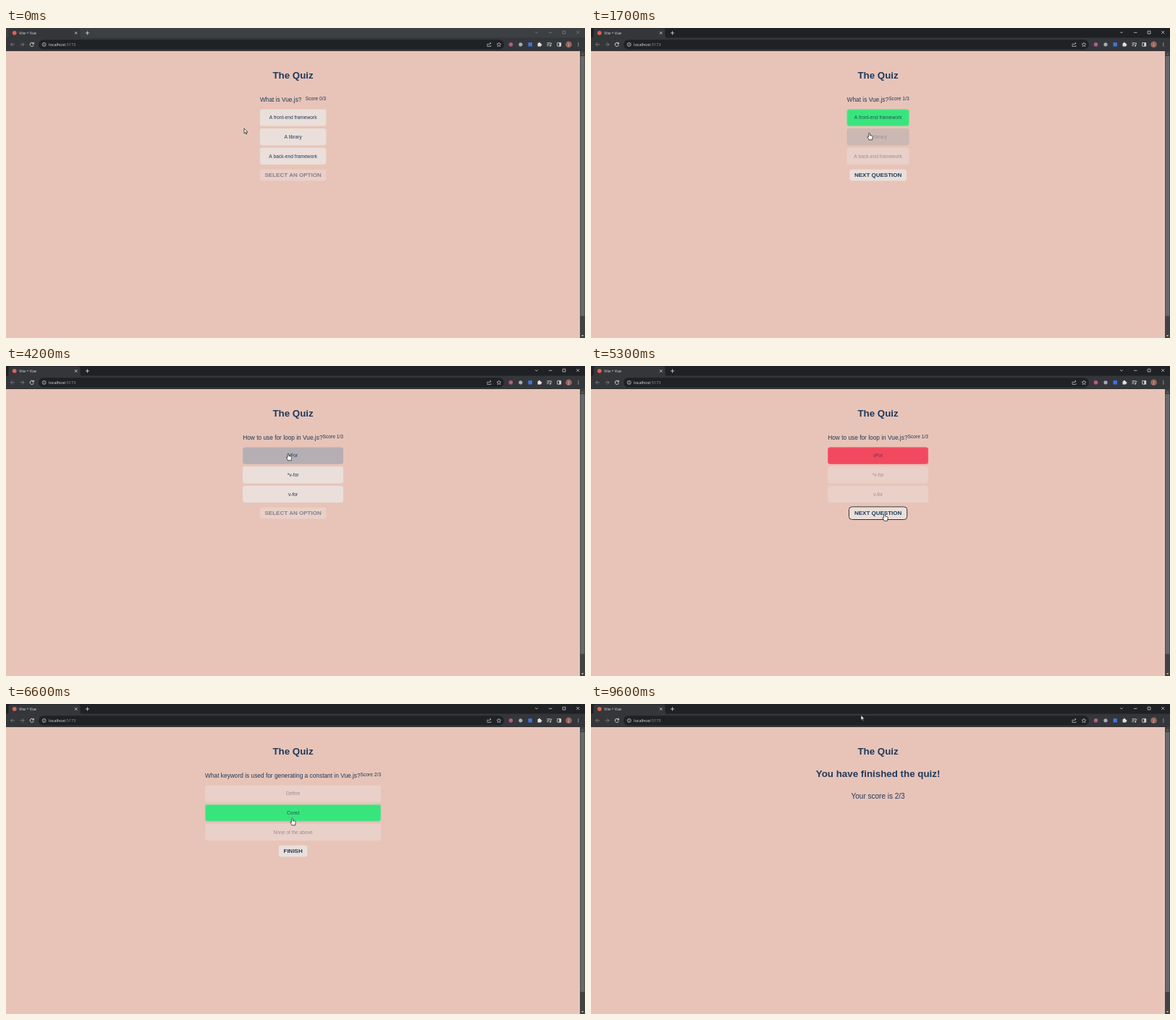
These frames come from a looping animation (800 px wide and 429 px high, 9800 ms). An HTML page with a canvas:

```html
<!DOCTYPE html>
<html lang="en">
<head>
<meta charset="utf-8">
<title>The Quiz</title>
<style>
  html, body { margin: 0; width: 100%; height: 100%; overflow: hidden; background: #e8c4b8; }
  canvas { display: block; width: 800px; height: 429px; }
</style>
</head>
<body>
<canvas id="stage" width="800" height="429"></canvas>
<script>
const ctx = document.getElementById('stage').getContext('2d');
const LOOP = 9800, CENTER = 396.6;
const NAVY = '#1f3a5c', PAPER = '#eadfda', FADED = '#e9d0c8';
const SANS = '"Liberation Sans", Arial, sans-serif';
const UI = '"Open Sans", "Noto Sans", sans-serif';

const questions = [
  { text: 'What is Vue.js?', options: ['A front-end framework', 'A library', 'A back-end framework'], pick: 0, right: true },
  { text: 'How to use for loop in Vue.js?', options: ['vFor', '*v-for', 'v-for'], pick: 0, right: false },
  { text: 'What keyword is used for generating a constant in Vue.js?', options: ['Define', 'Const', 'None of the above'], pick: 1, right: true }
];
const answerTimes = [1300, 4500, 6600];
const nextTimes = [2800, 5400, 8300];
const FOCUS_WINDOW = 1200;

// Pointer keyframes: time, x, y
const pointerPath = [
  [0, 329, 139], [800, 375, 122], [1500, 376, 123], [1700, 384.5, 145],
  [2100, 396, 221], [2400, 398, 205], [2700, 398, 205], [3200, 347.5, 170],
  [3600, 347.5, 170], [4200, 390, 121], [4600, 390, 121], [5050, 404, 211],
  [5300, 405.5, 204.5], [5600, 405.5, 204.5], [6000, 395.5, 158], [6600, 395.5, 158],
  [7000, 384, 240], [7100, 384, 240], [7500, 349, 237], [8100, 397.5, 207.5],
  [8300, 397.5, 207.5], [8600, 404, 256], [9100, 420, 47], [9600, 373, 15.5], [LOOP, 373, 15.5]
];

function pointerAt(time) {
  const i = pointerPath.findIndex(key => key[0] > time);
  const [t0, x0, y0] = pointerPath[i - 1], [t1, x1, y1] = pointerPath[i];
  const u = (time - t0) / (t1 - t0), ease = u * u * (3 - 2 * u);
  return { x: x0 + (x1 - x0) * ease, y: y0 + (y1 - y0) * ease };
}

function label(text, x, y, size, color = NAVY, { weight = 400, align = 'center', family = SANS } = {}) {
  ctx.font = `${weight} ${size}px ${family}`;
  ctx.textAlign = align;
  ctx.fillStyle = color;
  ctx.fillText(text, x, y);
}

function widthOf(text, size, weight = 400) {
  ctx.font = `${weight} ${size}px ${SANS}`;
  return ctx.measureText(text).width;
}

function rect(x, y, w, h, color) {
  ctx.fillStyle = color;
  ctx.fillRect(x, y, w, h);
}

function box(x, y, w, h, radius, fill, stroke, lineWidth = 1) {
  ctx.beginPath();
  ctx.roundRect(x, y, w, h, radius);
  if (fill) { ctx.fillStyle = fill; ctx.fill(); }
  if (stroke) { ctx.strokeStyle = stroke; ctx.lineWidth = lineWidth; ctx.stroke(); }
}

function dot(x, y, r, color) {
  box(x - r, y - r, 2 * r, 2 * r, r, color);
}

function line(path, color, width = 0.8) {
  ctx.strokeStyle = color;
  ctx.lineWidth = width;
  ctx.stroke(new Path2D(path));
}

function fillPath(path, color) {
  ctx.fillStyle = color;
  ctx.fill(new Path2D(path));
}

function drawBrowser(active) {
  const light = '#dfe1e5', dim = '#85878b';
  rect(0, 0, 800, 32, active ? '#202124' : '#3c4043');
  fillPath('M1 14 Q3.5 14 3.5 11 V3.5 Q3.5 0.5 6.5 0.5 H99.5 Q102.5 0.5 102.5 3.5 V11 Q102.5 14 105 14 Z', '#35363a');
  rect(0, 13.5, 800, 18.5, '#35363a');

  dot(11.7, 6.8, 2.9, '#d76552');
  label('Vite + Vue', 18, 8.8, 5.2, light, { align: 'left', family: UI });
  line('M95 5.2 l3.4 3.4 m0 -3.4 l-3.4 3.4 M110 6.9 h5 m-2.5 -2.5 v5', light);

  const controls = active ? light : dim;
  line('M731 5.2 l1.9 1.9 l1.9 -1.9 M750 6.3 h4.5 M769.2 4.2 h3.8 v3.8 h-3.8 z M788.2 4 l4 4 m0 -4 l-4 4', controls, 0.7);

  line('M12 22.8 h-5.5 m2.7 -2.7 l-2.7 2.7 l2.7 2.7 M19.5 22.8 h5.5 m-2.7 -2.7 l2.7 2.7 l-2.7 2.7', dim);
  line('M38 21.4 a2.6 2.6 0 1 0 .3 2.2 M38.3 19.8 v2.2 h-2.2', light, 0.9);

  box(45, 16.3, 643, 13.2, 6.6, '#202124');
  line('M55.2 22.9 a2.5 2.5 0 1 0 -5 0 a2.5 2.5 0 1 0 5 0 M52.7 22.5 v1.8 M52.7 21.3 v.6', light, 0.7);
  label('localhost', 59, 24.9, 5.55, '#e8eaed', { align: 'left', family: UI });
  label(':5173', 82.3, 24.9, 5.55, '#9aa0a6', { align: 'left', family: UI });
  line('M666.5 22 h-1.5 v3.5 h5 v-1.5 M666.8 23.7 q.3 -2.5 3.2 -2.5 m-1.4 -1.4 l1.5 1.4 l-1.5 1.4', light, 0.6);
  line('M681 20 l.9 1.9 l2.1 .2 l-1.6 1.4 l.5 2.1 l-1.9 -1.1 l-1.9 1.1 l.5 -2.1 l-1.6 -1.4 l2.1 -.2 z', light, 0.6);

  dot(697.5, 22.8, 2.8, '#b45a8c');
  dot(711, 22.8, 2.6, '#a9adb3');
  box(721.5, 20, 5.5, 5.5, 0.8, '#3b75de');
  box(734.6, 21, 4.6, 4.6, 0.6, light);
  dot(736.9, 20.8, 1.1, light);
  dot(739.4, 23.3, 1.1, light);
  line('M747.5 20.7 h5 M747.5 22.6 h3.4 M747.5 24.5 h2.2 M752.8 24.6 v-3.4 h1.5', light, 0.8);
  dot(752, 24.7, 0.9, light);
  box(761.7, 20.4, 5, 4.8, 0.4, null, light, 0.8);
  rect(764.4, 20.4, 2.3, 4.8, light);
  dot(777.5, 22.8, 4.3, '#98685f');
  label('J', 777.5, 24.7, 5, '#eee3df', { family: UI });
  for (const y of [20.8, 22.8, 24.8]) dot(790.8, y, 0.6, light);
}

function drawScrollbar() {
  rect(793, 32, 7, 397, '#424242');
  rect(793.6, 39, 5.8, 359.5, '#686868');
  fillPath('M795 36.8 l1.6 -1.9 l1.6 1.9 z', '#77797b');
  fillPath('M795 425.1 l1.6 1.9 l1.6 -1.9 z', '#d0d0d0');
}

function drawOption(text, index, left, width, question, answered, hovered) {
  const top = 112.5 + index * 26.6;
  const picked = answered && index === question.pick;
  let fill = hovered ? '#b5afb3' : PAPER, color = NAVY;
  if (picked) {
    fill = question.right ? '#38e57d' : '#f3495f';
    color = question.right ? '#1f5a52' : '#66314d';
  } else if (answered) {
    fill = hovered ? '#ccb8b2' : FADED;
    color = '#9c9092';
  }
  box(left, top, width, 23.3, 3.3, fill);
  if (picked) {
    box(left + 0.4, top + 0.4, width - 0.8, 22.5, 3, null, question.right ? '#84dc98' : '#ee6873', 0.8);
  }
  label(text, CENTER, top + 13.8, 6.667, color);
}

function drawQuiz(stage, time, pointer) {
  const question = questions[stage];
  const answered = time >= answerTimes[stage];
  const points = questions.filter((q, i) => q.right && time >= answerTimes[i]).length;
  const score = `Score ${points}/3`;
  const caption = !answered ? 'SELECT AN OPTION' : stage === 2 ? 'FINISH' : 'NEXT QUESTION';
  const buttonWidth = widthOf(caption, 8, 700) + 13.2;
  const width = Math.max(buttonWidth, widthOf(question.text, 8.333) + widthOf(score, 6.667));
  const left = CENTER - width / 2;

  label(question.text, left, 102.4, 8.333, NAVY, { align: 'left' });
  label(score, left + width, 100.4, 6.667, NAVY, { align: 'right' });

  let pointing = false;
  question.options.forEach((text, i) => {
    const top = 112.5 + i * 26.6;
    const hovered = Math.abs(pointer.x - CENTER) < width / 2 && pointer.y > top && pointer.y < top + 23.3;
    pointing ||= hovered;
    drawOption(text, i, left, width, question, answered, hovered);
  });

  const x = CENTER - buttonWidth / 2;
  box(x, 195.8, buttonWidth, 15.8, 3.3, answered ? PAPER : FADED);
  if (time >= nextTimes[stage] - 100) {
    box(x - 0.4, 195.3, buttonWidth + 0.8, 16.8, 3.6, null, '#f7f3f1', 1.2);
    box(x - 0.8, 194.9, buttonWidth + 1.6, 17.6, 4, null, '#17191c', 0.9);
  }
  label(caption, CENTER, 206.4, 8, answered ? NAVY : '#867f8a', { weight: 700 });
  const overButton = Math.abs(pointer.x - CENTER) < buttonWidth / 2 && pointer.y > 195.8 && pointer.y < 211.6;
  return pointing || (answered && overButton);
}

const ARROW = new Path2D('M0 0 V6.8 L1.6 5.4 L2.7 8 L3.8 7.5 L2.7 5 H4.9 Z');
const HAND = new Path2D('M-.9 .8 Q0 -.5 .9 .8 V3.5 L3.6 4.1 Q5 4.4 4.9 5.6 L4.2 8 V9.8 H-.6 L-.9 8.4 L-2.8 5.8 Q-2.6 4.4 -.9 5.6 Z');

function drawPointer({ x, y }, pointing) {
  const shape = pointing ? HAND : ARROW;
  ctx.save();
  ctx.translate(x, y);
  ctx.fillStyle = '#fff';
  ctx.strokeStyle = '#252525';
  ctx.lineWidth = 0.8;
  ctx.lineJoin = 'round';
  ctx.fill(shape);
  ctx.stroke(shape);
  ctx.restore();
}

function render(now) {
  const time = now % LOOP;
  const pointer = pointerAt(time);
  const stage = nextTimes.filter(t => time >= t).length;
  let pointing = false;

  rect(0, 0, 800, 429, '#e8c4b8');
  drawBrowser(time >= FOCUS_WINDOW);
  drawScrollbar();
  label('The Quiz', CENTER, 70.3, 13.333, NAVY, { weight: 700 });
  if (stage < 3) {
    pointing = drawQuiz(stage, time, pointer);
  } else {
    label('You have finished the quiz!', CENTER, 101.3, 13.333, NAVY, { weight: 700 });
    label('Your score is 2/3', CENTER, 130.8, 10);
  }
  drawPointer(pointer, pointing);
}

const start = performance.now();
(function tick() {
  render(performance.now() - start);
  requestAnimationFrame(tick);
})();
</script>
</body>
</html>
```
